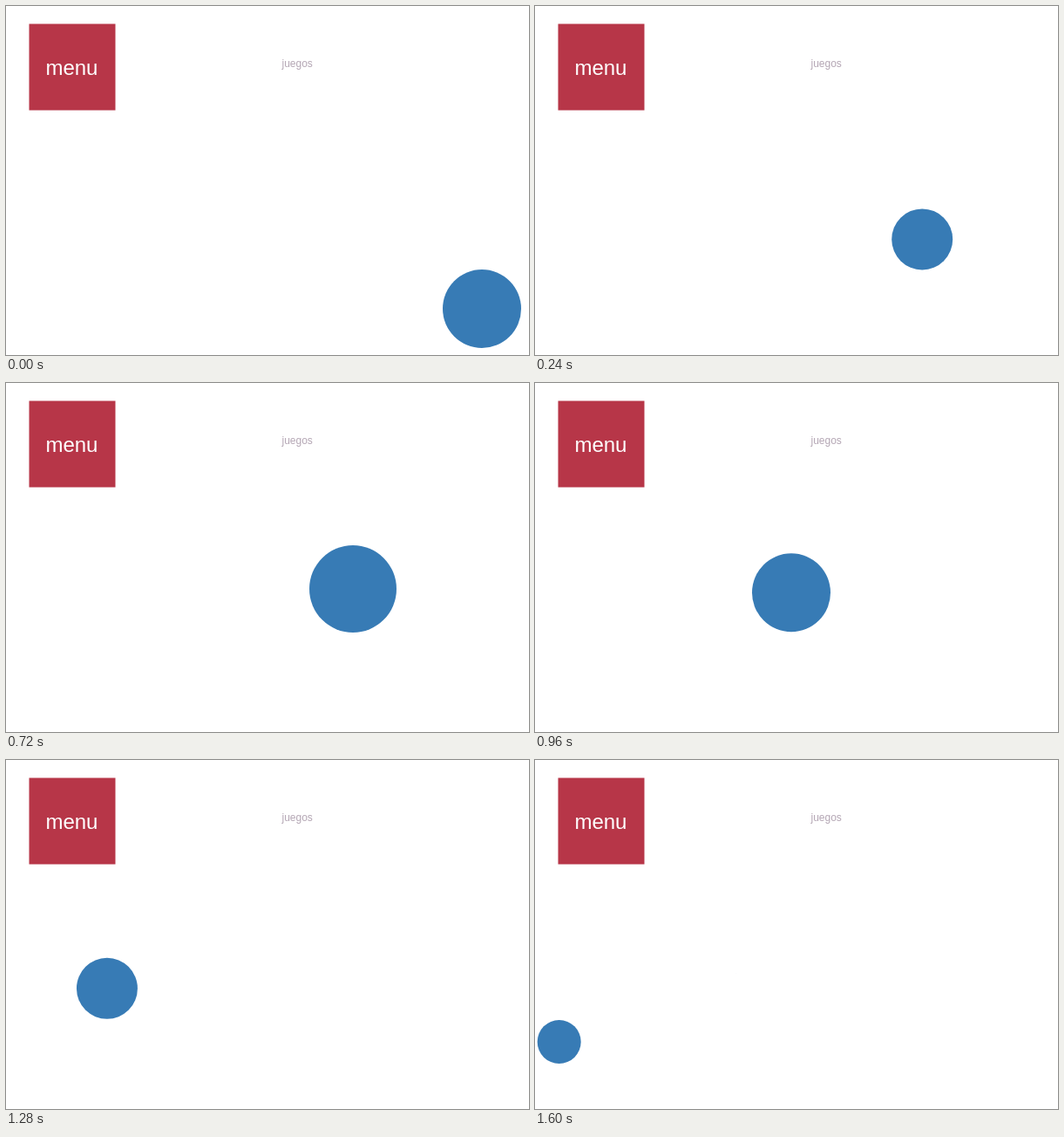
These frames come from a looping animation (600 px wide and 400 px high, 1.68 s). An HTML page:

```html
<!DOCTYPE html>
<html lang="es">
<head>
<meta charset="utf-8">
<title>Menu</title>
<style>
  html, body { margin: 0; width: 100%; height: 100%; overflow: hidden; background: #fff; }
  svg { display: block; }
  text { font-family: "Liberation Sans", Arial, sans-serif; }
</style>
</head>
<body>
<svg width="600" height="400" viewBox="0 0 600 400">
  <rect x="26.5" y="20.5" width="99" height="99" fill="#b73648"/>
  <text x="45.4" y="79" font-size="24" fill="#fff">menu</text>
  <text x="316.5" y="69.5" font-size="12" fill="#b4a6b4">juegos</text>
  <circle id="ball" fill="#377bb5"/>
</svg>
<script>
const LOOP = 1680, STEP = 80;
const SHRINK_CYCLE = 1000, SIZES = 6;
const ball = document.getElementById("ball");

// Time, left and top of the ball's box at each corner of its path
const path = [
  [0, 501, 302],
  [400, 348, 186],
  [800, 348, 186],
  [1200, 100.5, 209],
  [1600, 2.7, 298]
];

function positionAt(t) {
  const next = path.findIndex(([time]) => time >= t) || 1;
  const [t0, x0, y0] = path[next - 1];
  const [t1, x1, y1] = path[next];
  const k = (t - t0) / (t1 - t0);
  return [x0 + (x1 - x0) * k, y0 + (y1 - y0) * k];
}

// Diameter drops from 100 to 50 in steps of 10, then starts over
function diameterAt(t) {
  const phase = (t + 280) % SHRINK_CYCLE / SHRINK_CYCLE;
  return 100 - 10 * Math.floor(phase * SIZES);
}

function draw() {
  const t = Math.floor(performance.now() % LOOP / STEP) * STEP;
  const [x, y] = positionAt(t);
  const r = diameterAt(t) / 2;
  ball.setAttribute("cx", x + r);
  ball.setAttribute("cy", y + r);
  ball.setAttribute("r", r);
  requestAnimationFrame(draw);
}
draw();
</script>
</body>
</html>
```
